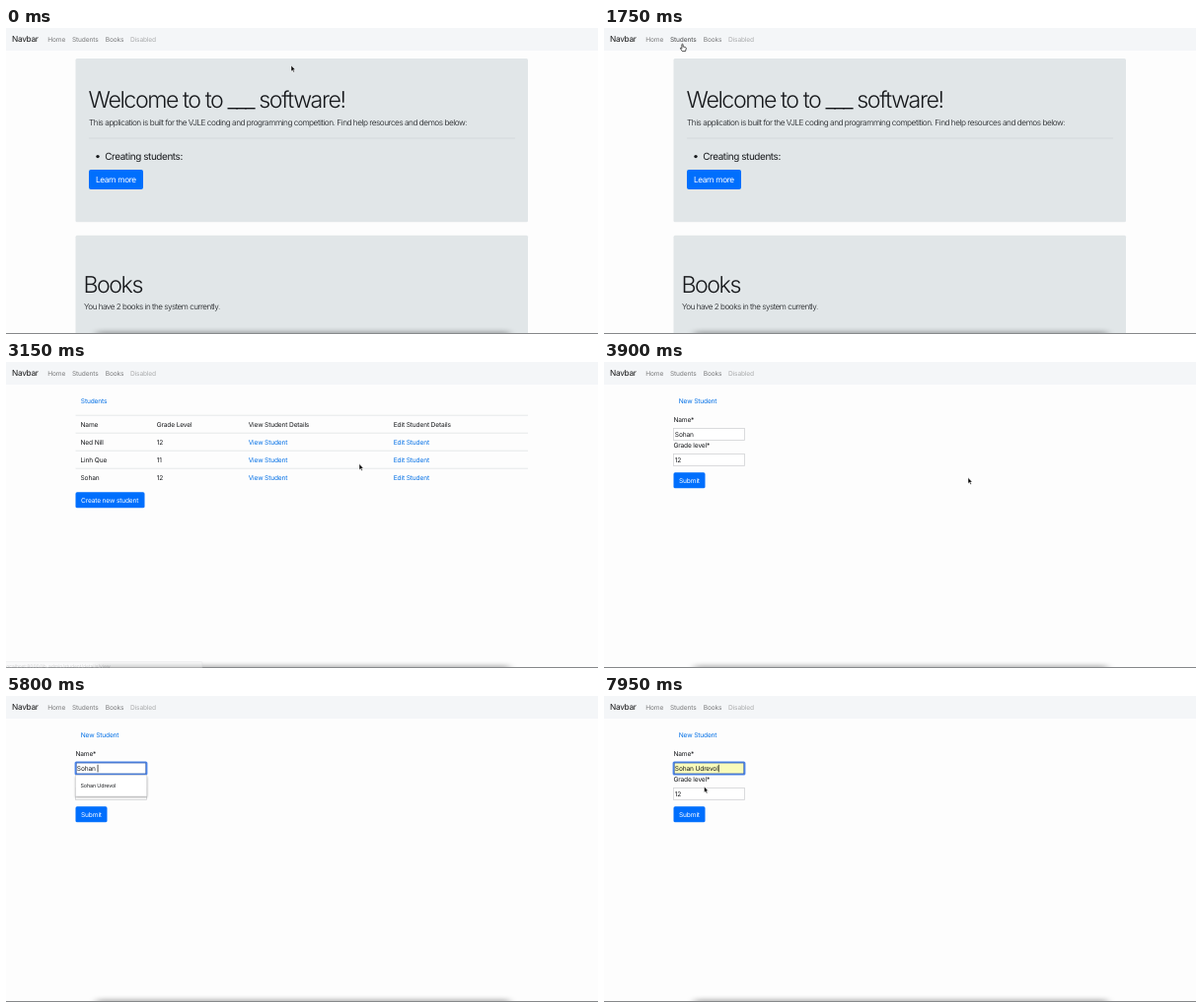
An HTML page for the animation above (8000 ms loop, 600x311 px).

```html
<!DOCTYPE html>
<html lang="en">
<head>
<meta charset="utf-8">
<title>Student records</title>
<style>
html, body { margin: 0; width: 100%; height: 100%; overflow: hidden; background: #fdfdfd; }
svg { display: block; width: 600px; height: 311px; }
text {
  font: 400 6.62px Inter, "Liberation Sans", sans-serif;
  font-optical-sizing: none;
  letter-spacing: -.023em;
  text-rendering: geometricPrecision;
  fill: #17191c;
  white-space: pre;
}
.brand { font-size: 8.27px; letter-spacing: -.035em; }
.nav text { fill: #7b7c7d; }
.nav .brand { fill: #18191a; }
.nav .off { fill: #abacad; }
.nav .hover { fill: #4b4c4d; }
.display { font-size: 23.2px; font-weight: 300; letter-spacing: -.062em; }
.lead { font-size: 8.27px; font-weight: 300; letter-spacing: -.058em; }
.item { font-size: 9.92px; letter-spacing: -.04em; }
.btn { fill: #006ffd; }
.btn-text { fill: #fff; }
.big { font-size: 8.27px; letter-spacing: -.048em; }
.panel { fill: #e1e6e8; }
.page .link { fill: #006fe6; }
.page .hover { fill: #0053b0; text-decoration: underline; }
.rule { stroke: #dfe2e5; stroke-width: .8; }
.field { fill: #fff; stroke: #d2d3d5; stroke-width: .8; }
.small { font-size: 5.4px; }
.status { font-size: 5px; fill: #77797c; letter-spacing: -.01em; }
</style>
</head>
<body>
<svg viewBox="0 0 600 311">
  <defs>
    <filter id="soft" x="-10%" y="-400%" width="120%" height="900%"><feGaussianBlur stdDeviation="4 2"/></filter>
    <filter id="drop" x="-10%" y="-20%" width="120%" height="160%"><feGaussianBlur stdDeviation="1"/></filter>
  </defs>
  <rect width="600" height="311" fill="#fdfdfd"/>

  <g class="nav">
    <rect width="600" height="23" fill="#f4f6f8"/>
    <text class="brand" x="6" y="14.4">Navbar</text>
    <text class="link" x="42.3" y="14">Home</text>
    <text class="link" x="67" y="14">Students</text>
    <text class="link" x="100.8" y="14">Books</text>
    <text class="off" x="126" y="14">Disabled</text>
  </g>

  <g class="page">
    <rect class="panel" x="70.5" y="31" width="458.5" height="166.3" rx="1.5"/>
    <text class="display" x="83.6" y="81">Welcome to to ___ software!</text>
    <text class="lead" x="84" y="98.6">This application is built for the VJLE coding and programming competition. Find help resources and demos below:</text>
    <path d="M84 112H516" stroke="#d1d6d8" stroke-width=".8"/>
    <circle cx="93" cy="130.6" r="1.7" fill="#17191c"/>
    <text class="item" x="100.2" y="133.7">Creating students:</text>
    <rect class="btn" x="84" y="144" width="55" height="20" rx="2"/>
    <text class="btn-text big" x="91" y="157.1">Learn more</text>
    <rect class="panel" x="70.5" y="210.8" width="458.5" height="104" rx="1.5"/>
    <text class="display" x="78.4" y="268.8">Books</text>
    <text class="lead" x="79" y="286.3" style="font-size:8.1px">You have 2 books in the system currently.</text>
  </g>

  <g class="page" id="table">
    <text class="link" x="75.8" y="42">Students</text>
    <path class="rule" d="M70.5 54.2H529M70.5 72.2H529M70.5 90.2H529M70.5 108.2H529"/>
    <rect class="btn" x="70.5" y="132.3" width="70" height="16" rx="1.6"/>
    <text class="btn-text" x="76" y="142.8">Create new student</text>
  </g>

  <g class="page">
    <text class="link" x="75.8" y="42">New Student</text>
    <text x="70.4" y="61.4">Name*</text>
    <rect class="field" id="name" x="70.5" y="67.5" width="72" height="12"/>
    <g id="focus" fill="none">
      <rect x="70.5" y="67.3" width="72" height="12.4" rx=".8" stroke="#4c86ec" stroke-width="1.8"/>
      <rect x="71.2" y="68" width="70.6" height="11" stroke="#3d5a96" stroke-width=".5"/>
    </g>
    <text id="typed" x="71.8" y="75.9"></text>
    <rect id="caret" y="69.8" width=".7" height="7.6"/>
    <text x="70.4" y="87.4">Grade level*</text>
    <rect class="field" x="70.5" y="93.5" width="72" height="12"/>
    <text x="71.8" y="102">12</text>
    <rect class="btn" x="70.5" y="112.3" width="32" height="16" rx="1.6"/>
    <text class="btn-text" x="76" y="122.8">Submit</text>
    <g id="menu">
      <rect x="70.5" y="82" width="72.5" height="21" fill="#000" opacity=".35" filter="url(#drop)"/>
      <rect x="70.4" y="80.4" width="72.4" height="21.6" fill="#fff" stroke="#c9cacc" stroke-width=".5"/>
      <rect id="choice" x="70.7" y="86" width="71.8" height="10.5" fill="#e6e8ea"/>
      <text class="small" x="75.5" y="93.2">Sohan Udrevol</text>
    </g>
  </g>

  <rect x="92" y="308" width="418" height="6" fill="#000" opacity=".26" filter="url(#soft)"/>
  <rect y="310" width="600" height="1" fill="#86888a"/>
  <g id="status">
    <rect x="-1" y="304.6" width="200" height="8" rx="1" fill="#f3f4f5" stroke="#c8cacc" stroke-width=".6"/>
    <text class="status" x="-1" y="310.6"></text>
  </g>

  <circle id="click" r="7" fill="#fff" fill-opacity=".45" stroke="#1c1c1c" stroke-width="1"/>
  <g id="pointer" stroke-linejoin="round">
    <path d="M0 0V6.1L1.4 4.9L2.4 7.1L3.4 6.6L2.4 4.5H4.2Z" fill="#000" stroke="#fff" stroke-width=".5"/>
    <path d="M-.6 .6Q0 -.2 .6 .6V3L3 3.5Q3.9 3.8 3.8 4.8L3 7.6H-.2L-2 4.9Q-2.2 4 -1.3 4.1L-.6 4.8Z" fill="#fff" stroke="#111" stroke-width=".7"/>
    <path d="M-1.3 -3.2Q0 -3.2 0 -2.4Q0 -3.2 1.3 -3.2M0 -2.4V2.4M-1.3 3.2Q0 3.2 0 2.4Q0 3.2 1.3 3.2M-.7 .9H.7" fill="none" stroke="#111" stroke-width=".7"/>
  </g>
</svg>
<script>
const LOOP = 8000;
const $ = id => document.getElementById(id);
const all = (sel, root = document) => [...root.querySelectorAll(sel)];
const show = (el, on) => { el.style.display = on ? '' : 'none'; };
const between = (t, a, b) => t >= a && t < b;

const columns = [75.5, 152.7, 245.7, 392.8];
const rows = [
  ['Name', 'Grade Level', 'View Student Details', 'Edit Student Details'],
  ...[['Ned Nill', 12], ['Linh Que', 11], ['Sohan', 12]].map(r => [...r, 'View Student', 'Edit Student'])
];
rows.forEach((row, r) => row.forEach((label, c) => {
  const cell = document.createElementNS('http://www.w3.org/2000/svg', 'text');
  cell.setAttribute('x', columns[c]);
  cell.setAttribute('y', 65.5 + r * 18);
  if (r && c > 1) cell.setAttribute('class', 'link');
  cell.textContent = label;
  $('table').append(cell);
}));

// pointer route: time, x, y
const route = [
  [0, 289, 38], [50, 289, 38], [450, 205, 149], [850, 122, 118],
  [1250, 112, 16], [1470, 94, 5], [1700, 79.5, 16], [2350, 79.5, 16],
  [2550, 175, 97], [2650, 175, 97], [2900, 265, 99], [3150, 358, 103.5],
  [3500, 411, 116], [3750, 411, 116], [4300, 181, 124], [4450, 181, 124],
  [4800, 121, 72.7], [7050, 121, 72.7], [7400, 98, 91], [7650, 92, 91],
  [7700, 92, 91], [7900, 87, 84], [7950, 101.5, 92], [8000, 101.5, 92]
];

const slope = (i, k) => {
  const a = route[i - 1], p = route[i], b = route[i + 1];
  if (!a || !b || a[k] === p[k] || b[k] === p[k]) return 0;
  return (b[k] - a[k]) / (b[0] - a[0]);
};

function pointerAt(t) {
  let i = 0;
  while (i < route.length - 2 && route[i + 1][0] <= t) i++;
  const a = route[i], b = route[i + 1], d = b[0] - a[0], u = (t - a[0]) / d, v = 1 - u;
  return [1, 2].map(k =>
    v * v * (1 + 2 * u) * a[k] + u * u * (3 - 2 * u) * b[k] +
    d * u * v * (v * slope(i, k) - u * slope(i + 1, k)));
}

const hits = (el, [x, y], pad = 0) => {
  const b = el.getBBox();
  return x > b.x - pad && x < b.x + b.width + pad && y > b.y - pad && y < b.y + b.height + pad;
};

const keys = [5800, 6050, 6200, 6450, 6550, 6650, 6800, 6850];
const statuses = [
  [1300, 1550, 'books'], [2850, 3050, 'student/details/view'], [3400, 3700, 'student/details/edit']
];
const pages = all('.page');
const navLinks = all('.nav .link');
const pageLinks = pages.map(p => all('.link', p));
const shapes = [...$('pointer').children];

function drawForm(t, pos) {
  const open = between(t, 5800, 7700);
  const chosen = t >= 7100 && (t >= 7700 || pos[1] > 86);
  $('typed').textContent = 'Sohan' + ' Udrevol'.slice(0, keys.filter(k => k <= t).length);
  $('caret').setAttribute('x', 72 + $('typed').getComputedTextLength());
  show($('focus'), t >= 4900);
  show($('caret'), between(t, 4900, 5300) || t >= 5800);
  show($('menu'), open);
  show($('choice'), chosen);
  $('name').style.fill = chosen ? '#f9fbba' : '#fff';
}

function drawStatus(t) {
  const now = statuses.find(([a, b]) => between(t, a, b + 150));
  show($('status'), now);
  if (!now) return;
  const [a, b, path] = now;
  $('status').style.opacity = Math.min(1, (t - a) / 100, (b + 150 - t) / 150);
  $('status').lastElementChild.textContent = 'localhost:8000/lib_admin/' + path;
}

function drawPointer(t, pos, page) {
  const fresh = between(t, 1800, 2100);
  let over = false;
  const mark = (el, pad) => {
    const hit = hits(el, pos, pad);
    over = over || hit;
    el.classList.toggle('hover', hit && !fresh);
  };
  navLinks.forEach(el => mark(el, 3));
  pageLinks[page].forEach(el => mark(el, 1));
  const typing = page === 2 && hits($('name'), pos);
  const kind = over ? 1 : typing ? 2 : 0;
  shapes.forEach((s, i) => show(s, i === kind));
  show($('pointer'), !between(t, 5800, 7100));
  const move = `translate(${pos})`;
  $('pointer').setAttribute('transform', move);
  $('click').setAttribute('transform', move);
  show($('click'), between(t, 4850, 5350) || between(t, 7600, 7700));
  $('click').style.opacity = between(t, 5300, 5350) ? .5 : 1;
}

function draw(t) {
  const page = t < 1800 ? 0 : t < 3800 ? 1 : 2;
  const pos = pointerAt(t);
  pages.forEach((p, i) => show(p, i === page));
  if (page === 2) drawForm(t, pos);
  drawStatus(t);
  drawPointer(t, pos, page);
}

let start;
function tick(now) {
  start ??= now;
  draw((now - start) % LOOP);
  requestAnimationFrame(tick);
}
draw(0);
requestAnimationFrame(tick);
</script>
</body>
</html>
```
